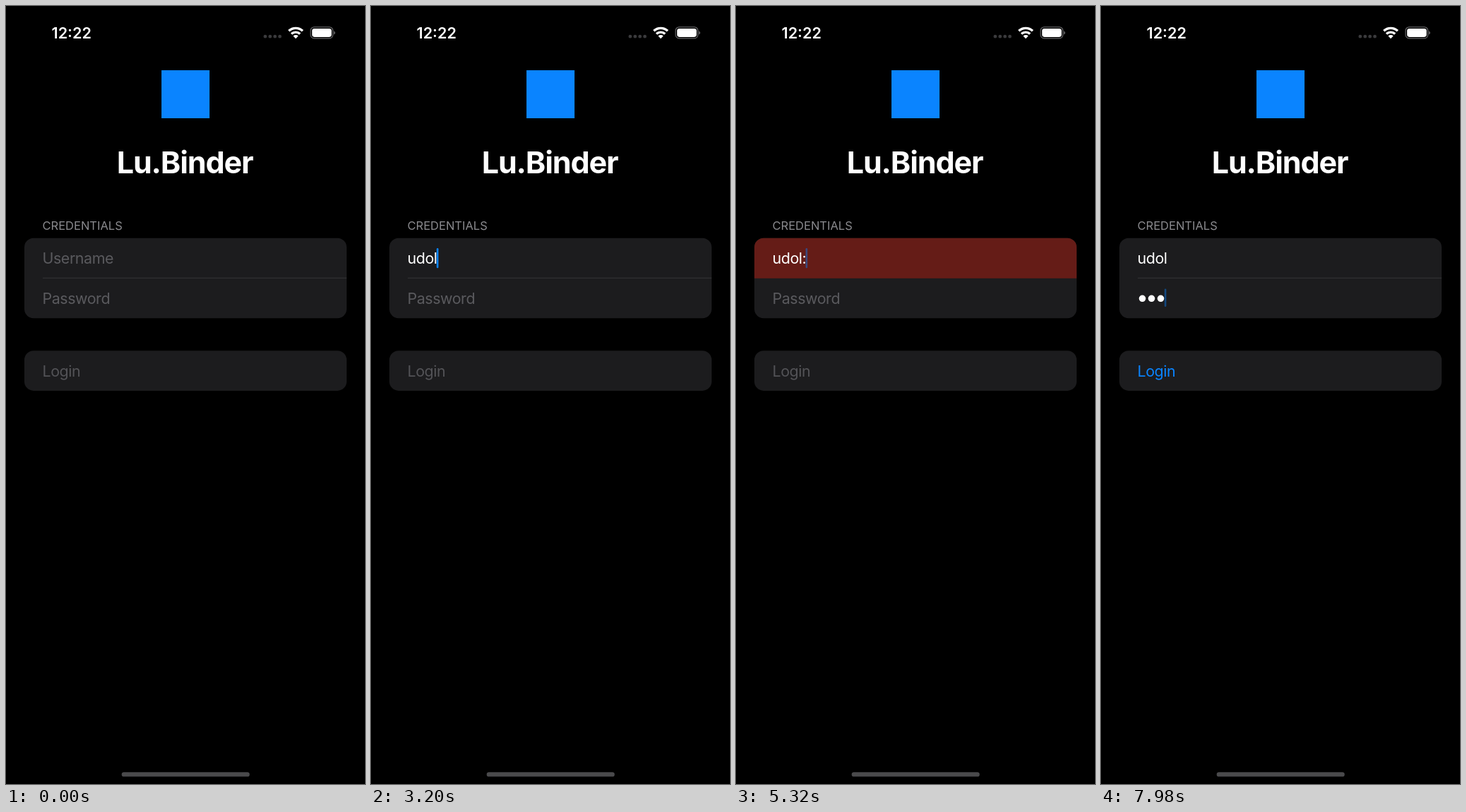
Write an HTML page that moves like this. It is 508 px wide and 1102 px high and loops after 8000 ms.

```html
<!DOCTYPE html>
<html lang="en">
<head>
<meta charset="utf-8">
<title>Login</title>
<style>
  html, body { margin: 0; width: 100%; height: 100%; overflow: hidden; background: #000; }
  svg { display: block; width: 100%; height: 100%; }
  text { font-family: Inter, "Liberation Sans", sans-serif; fill: #fff; white-space: pre; }
  .row { font-size: 21.4px; letter-spacing: -0.43px; }
  .hint { fill: #5a5a5e; }
  .card { fill: #1c1c1e; }
  .mid { text-anchor: middle; }
</style>
</head>
<body>
<svg viewBox="0 0 508 1102">
  <rect width="508" height="1102" fill="#000"/>

  <!-- Status bar -->
  <text class="mid" x="92.7" y="45.8" font-size="21.6" font-weight="600">12:22</text>
  <path d="M366.8 43.2H388" stroke="#3b3b3d" stroke-width="4.8"
        stroke-linecap="round" stroke-dasharray="0 6.9"/>
  <g fill="none" stroke="#fff" stroke-width="3.3">
    <path d="M400.2 35.3a14 14 0 0 1 19.6 0"/>
    <path d="M403.9 39.5a8.8 8.8 0 0 1 12.2 0"/>
  </g>
  <path d="M406.4 42.5a5.3 5.3 0 0 1 7.2 0L410 46.2z" fill="#fff"/>
  <rect x="431" y="29.8" width="31.6" height="16" rx="5" fill="none" stroke="#666668" stroke-width="1.2"/>
  <rect x="433.1" y="31.9" width="27.6" height="12" rx="3.3" fill="#fff"/>
  <path d="M464 35.4q1.9.6 1.9 2.5t-1.9 2.5z" fill="#666668"/>

  <!-- App mark and title -->
  <rect x="220" y="91" width="68" height="68" fill="#0a84ff"/>
  <text class="mid" x="253" y="237" font-size="43" font-weight="700" letter-spacing="-1.1">Lu.Binder</text>

  <!-- Form -->
  <text x="51.5" y="316.8" font-size="16.5" style="fill:#8a8a8e">CREDENTIALS</text>
  <rect class="card" x="26" y="328.7" width="456" height="113.6" rx="13"/>
  <path id="line" d="M52 385.4H482" stroke="#303032" stroke-width="1.1"/>
  <path id="alert" d="M26 385.7V341.7a13 13 0 0 1 13-13H469a13 13 0 0 1 13 13V385.7z" fill="#651c17"/>
  <text id="user" class="row" x="51.5" y="365"></text>
  <text id="pass" class="row hint" x="51.5" y="421.8">Password</text>
  <path id="dots" stroke="#fff" stroke-width="9.6" stroke-linecap="round"/>
  <rect id="caret" width="2.6" rx="1.2" fill="#0a84ff"/>
  <rect class="card" x="26" y="488.2" width="456" height="56.7" rx="13"/>
  <text id="login" class="row" x="51.5" y="524.7">Login</text>

  <rect x="163.7" y="1085.2" width="181" height="6.4" rx="3.2" fill="#4a4a4c"/>
</svg>
<script>
const LOOP = 8000, LEFT = 51.5, DOT_STEP = 13;
const FOCUS = "focus", ERASE = "erase", NEXT = "next";
const { user, pass, dots, login, caret, line, alert: alertRow } =
  Object.fromEntries([...document.querySelectorAll("[id]")].map(node => [node.id, node]));

// What the person does, and when
const actions = [
  [1920, FOCUS], [2290, "u"], [3030, "do"], [3200, "l"], [4370, ":"],
  [6070, ERASE], [6450, NEXT], [7250, "••"], [7390, "•"]
];

// Replay every action up to time t
function formAt(t) {
  const form = { fields: ["", ""], active: 0, last: null };
  for (const [time, key] of actions) {
    if (time > t) break;
    const { fields, active } = form;
    if (key === NEXT) form.active = 1;
    else if (key === ERASE) fields[active] = fields[active].slice(0, -1);
    else if (key !== FOCUS) fields[active] += key;
    form.last = time;
  }
  return form;
}

// Solid after each action, then fades out and back in
function caretOpacity(age) {
  const phase = age % 1200, fade = 160;
  const out = 1 - (phase - 500) / fade;
  const back = (phase - 880) / fade;
  return Math.min(1, Math.max(0, out, back));
}

const show = (node, on) => node.setAttribute("visibility", on ? "visible" : "hidden");

function draw(t) {
  const { fields: [name, secret], active, last } = formAt(t);
  const bad = name.includes(":");
  const text = name || "Username";
  if (user.textContent !== text) user.textContent = text;
  user.classList.toggle("hint", !name);

  show(alertRow, bad);
  show(line, !bad);
  show(pass, !secret);
  const dot = (_, i) => `M${58.5 + i * DOT_STEP} 414.3h.01`;
  dots.setAttribute("d", [...secret].map(dot).join(""));
  login.style.fill = secret ? "#0a84ff" : "#535357";

  const nameWidth = name ? user.getComputedTextLength() : 0;
  caret.setAttribute("x", LEFT - .7 + (active ? secret.length * DOT_STEP : nameWidth));
  caret.setAttribute("y", active ? 400.6 : 343);
  caret.setAttribute("height", active ? 25.4 : 28.2);
  caret.setAttribute("opacity", last === null ? 0 : caretOpacity(t - last));
}

const began = performance.now();
function tick() {
  draw((performance.now() - began) % LOOP);
  requestAnimationFrame(tick);
}
tick();
</script>
</body>
</html>
```
